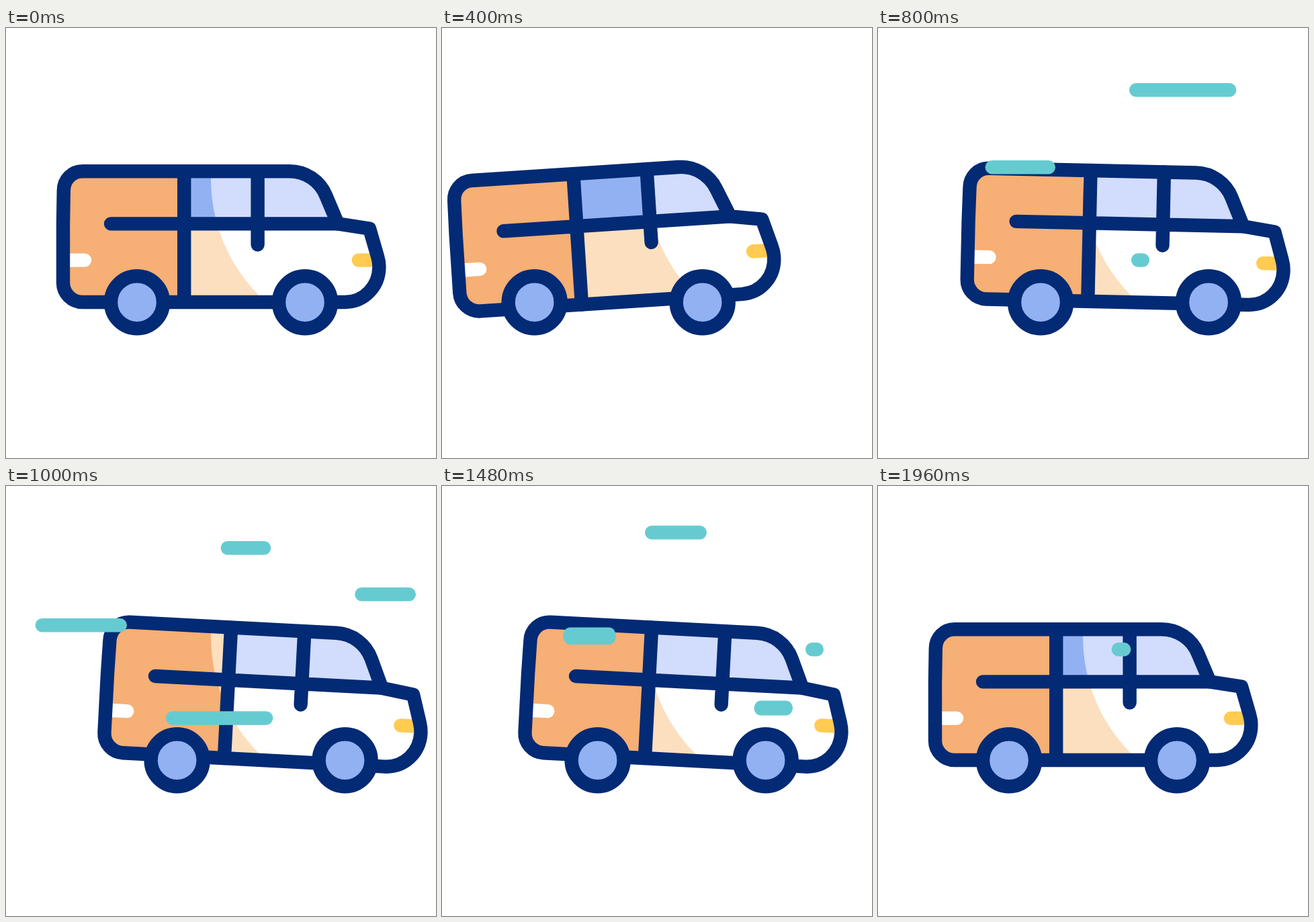
An HTML page with a canvas that plays this animation: 640x640 px, repeating every 2 s.

```html
<!DOCTYPE html>
<html lang="en">
<head>
<meta charset="utf-8">
<title>Van</title>
<style>
  html, body { margin: 0; width: 100%; height: 100%; overflow: hidden; background: #fff; }
  canvas { display: block; width: 100%; height: 100%; }
</style>
</head>
<body>
<canvas id="stage" width="640" height="640"></canvas>
<script>
const ctx = document.getElementById('stage').getContext('2d');
const LOOP = 2000, STEP = 40, LINE = 20.4;
const NAVY = '#032a74', BLUE = '#92b1f3', SKY = '#d2dcfc', ORANGE = '#f6af74',
      PEACH = '#fcdfbe', WHITE = '#fff', YELLOW = '#ffcb50', TEAL = '#66cbd1';
const PIVOT = { x: 320, y: 408 };

// Keys: [time, value], eased in and out between neighbours
const SHIFT = [[0, 0], [420, -57.7], [424, -57.7], [896, 59.6], [1233, 59.6], [1817, 0], [2000, 0]];
const TILT = [[0, 0], [450, -3.85], [485, -3.85], [955, 3], [1535, 3], [1900, 0], [2000, 0]];

// Wind streaks: right end, y, travel, start time, thickness
const STREAKS = [
  [540, 92.2, 200, 560, LINE],
  [264, 207.3, 200, 637, LINE],
  [404, 345.5, 200, 760, LINE],
  [610, 161.2, 200, 854, LINE],
  [394, 69.2, 218, 1340, LINE],
  [259, 223.3, 221, 1357, 25.4],
  [522, 330.5, 185, 1375, 22],
  [568, 243.2, 200, 1440, LINE]
];
const GROW = 365, TAIL_DELAY = 200;

const body = new Path2D(
  'M114 213.2 H422 C446 213.2 467 227.5 476 249 L494 291.4 L541 298.7 ' +
  'L553 340 C554.6 345.5 555.4 350 555.4 355 C555.4 385 533 408 504 408 ' +
  'H114 C98 408 85 395 85 379 V291.5 L85.8 242 C85.8 226 98 213.2 114 213.2 Z');
const frame = new Path2D(
  'M156 291.4 H494 M265.2 213.2 V408 M374.6 213.2 V322.5');

function ease(u) {
  u = Math.min(1, Math.max(0, u));
  return u * u * (3 - 2 * u);
}

function valueAt(keys, t) {
  const i = keys.findIndex(k => k[0] > t);
  const [t0, a] = keys[i - 1], [t1, b] = keys[i];
  return a + (b - a) * ease((t - t0) / (t1 - t0));
}

function rect(color, x, y, w, h) {
  ctx.fillStyle = color;
  ctx.fillRect(x, y, w, h);
}

function pill(color, left, right, y, h, cap = 10.2) {
  ctx.fillStyle = color;
  ctx.beginPath();
  ctx.ellipse(left + cap, y, cap, h / 2, 0, Math.PI / 2, Math.PI * 1.5);
  ctx.ellipse(right - cap, y, cap, h / 2, 0, -Math.PI / 2, Math.PI / 2);
  ctx.fill();
}

function panels(cargo, glass, door) {
  rect(cargo, 70, 190, 195, 230);
  rect(glass, 265, 190, 320, 101);
  rect(door, 265, 291, 320, 130);
}

function place(shift, tilt) {
  ctx.translate(PIVOT.x + shift, PIVOT.y);
  ctx.rotate(tilt * Math.PI / 180);
  ctx.translate(-PIVOT.x, -PIVOT.y);
}

function drawBody(shift, tilt) {
  ctx.save();
  place(shift, tilt);
  ctx.clip(body);
  panels(ORANGE, BLUE, PEACH);

  // The lit area stays still while the van passes through it
  ctx.save();
  ctx.setTransform(1, 0, 0, 1, 0, 0);
  ctx.beginPath();
  ctx.arc(550, 225, 245, 0, Math.PI * 2);
  ctx.clip();
  place(shift, tilt);
  panels(PEACH, SKY, WHITE);
  ctx.restore();

  pill(WHITE, 70, 127.3, 345.6, LINE);
  pill(YELLOW, 514.6, 575, 345.6, LINE);
  ctx.restore();

  ctx.save();
  place(shift, tilt);
  ctx.strokeStyle = NAVY;
  ctx.lineWidth = LINE;
  ctx.lineCap = ctx.lineJoin = 'round';
  ctx.stroke(body);
  ctx.stroke(frame);
  ctx.restore();
}

function drawWheel(x) {
  ctx.beginPath();
  ctx.arc(x, 408.2, 39, 0, Math.PI * 2);
  ctx.fillStyle = BLUE;
  ctx.fill();
  ctx.strokeStyle = NAVY;
  ctx.lineWidth = LINE;
  ctx.stroke();
}

function drawStreak([right, y, travel, start, h], t) {
  const head = ease((t - start) / GROW);
  const tail = ease((t - start - TAIL_DELAY) / GROW);
  if (head <= tail) return;
  pill(TEAL, right - LINE - head * travel, right - tail * travel, y, h);
}

function draw(t) {
  const shift = valueAt(SHIFT, t), tilt = valueAt(TILT, t);
  rect(WHITE, 0, 0, 640, 640);
  drawBody(shift, tilt);
  drawWheel(195 + shift);
  drawWheel(445 + shift);
  STREAKS.forEach(s => drawStreak(s, t));
}

const begin = performance.now();
function tick() {
  const t = Math.max(0, performance.now() - begin) % LOOP;
  draw(Math.floor(t / STEP) * STEP);
  requestAnimationFrame(tick);
}
tick();
</script>
</body>
</html>
```
